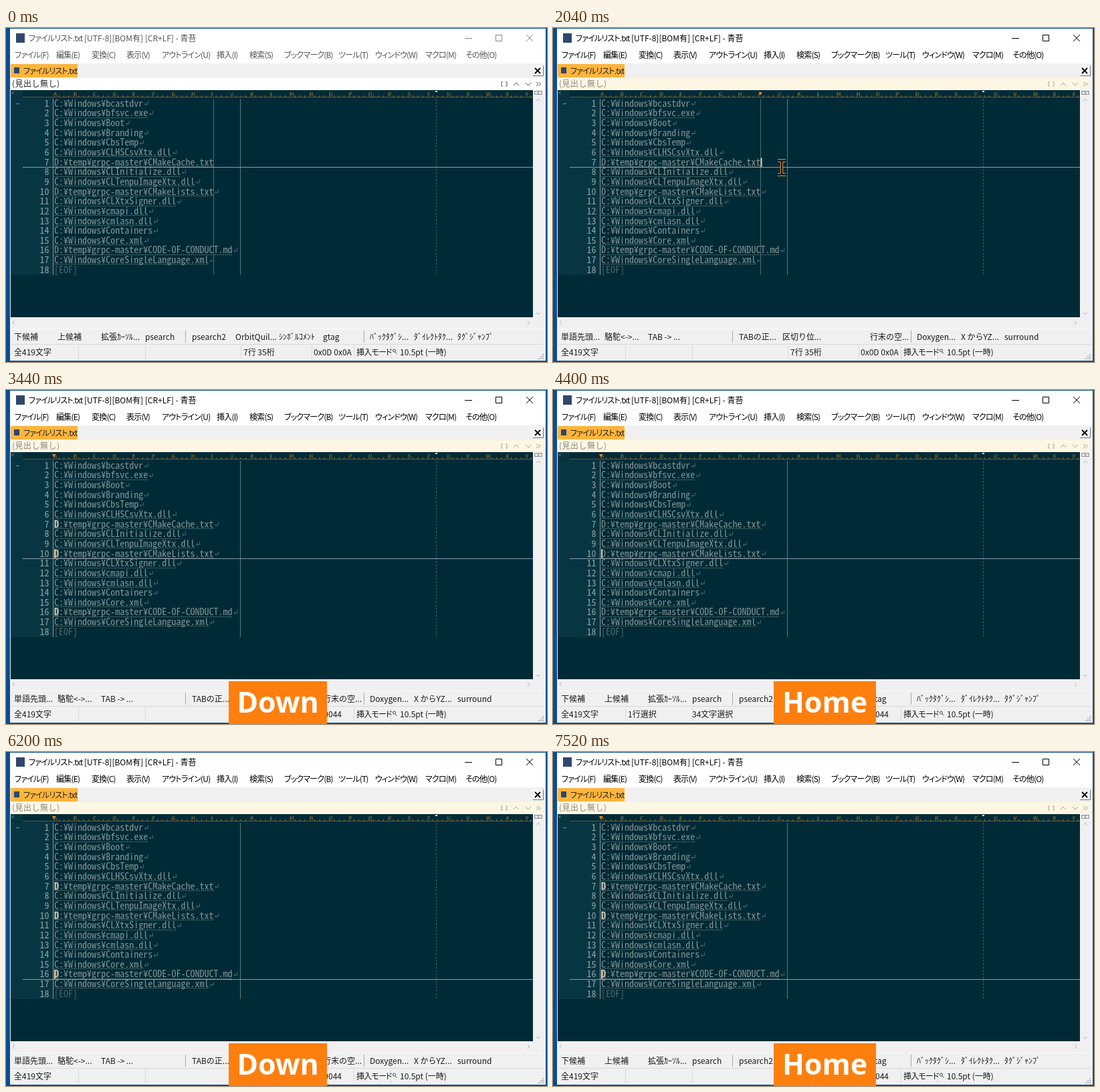
Animation of 809x500 px, one loop 8 s. Source, as an HTML page:

```html
<!DOCTYPE html>
<html lang="ja">
<head>
<meta charset="utf-8">
<title>Editor</title>
<style>
html, body { margin: 0; width: 100%; height: 100%; overflow: hidden; background: #f0f0f0; }
svg { display: block; width: 809px; height: 500px; }
text { white-space: pre; font: 12px "Noto Sans CJK JP", "Noto Sans CJK", "Noto Sans", sans-serif; }
.kana { font-feature-settings: "palt"; letter-spacing: -.8px; }
.code { font-family: "Noto Sans Mono CJK JP", "Noto Sans Mono", monospace; }
.key { font: bold 43px "Open Sans", "Noto Sans", sans-serif; word-spacing: 3px; }
.tiny { font-size: 7px; }
</style>
</head>
<body>
<svg viewBox="0 0 809 500"><g id="scene"></g><g id="mouse"></g></svg>
<script>
const LOOP = 8000, ROW = 14.65, TOP = 106, LEFT = 72, CHAR = 7.02, EDGE = 788;
const files = ['bcastdvr', 'bfsvc.exe', 'Boot', 'Branding', 'CbsTemp', 'CLHSCsvXtx.dll',
  '*CMakeCache.txt', 'CLInitialize.dll', 'CLTenpuImageXtx.dll', '*CMakeLists.txt',
  'CLXtxSigner.dll', 'cmapi.dll', 'cmlasn.dll', 'Containers', 'Core.xml',
  '*CODE-OF-CONDUCT.md', 'CoreSingleLanguage.xml'];
const lines = files.map(f => f[0] === '*' ? 'D:¥temp¥grpc-master¥' + f.slice(1) : 'C:¥Windows¥' + f);

const menus = [[13, 'ファイル(F)'], [75, '編集(E)'], [128, '変換(C)'], [180, '表示(V)'],
  [233, 'アウトライン(U)'], [315, '挿入(I)'], [364, '検索(S)'], [416, 'ブックマーク(B)'],
  [497, 'ツール(T)'], [552, 'ウィンドウ(W)'], [627, 'マクロ(M)'], [687, 'その他(O)']];
const slots = [12, 77, 142, 208, 278, 343, 408, 474, 544, 610, 675];
const bars = [
  ['下候補', '上候補', '拡張ｶｰｿﾙ...', 'psearch', 'psearch2', 'OrbitQuil...', 'ｼﾝﾎﾞﾙｺﾒﾝﾄ', 'gtag',
    'ﾊﾞｯｸﾀｸﾞｼ...', 'ﾀﾞｲﾚｸﾄﾀｸ...', 'ﾀｸﾞｼﾞｬﾝﾌﾟ'],
  ['単語先頭...', '駱駝<->...', 'TAB -> ...', '', 'TABの正...', '区切り位...', '', '行末の空...',
    'Doxygen...', 'X からYZ...', 'surround']];
// key label: [left, width, top]
const keys = { 'Down': [333, 147, 436], 'Home': [330, 153, 436], 'Shift + End': [275, 260, 433],
  'Shift + Home': [250, 311, 433], 'Ctrl + Shift + C': [202, 409, 433] };

// Each step changes part of the state and holds until the next one.
const steps = [
  [0, { active: 0, line: 7, col: 34, bar: 0, hit: '', sel: 0, info: 0, key: '', mark: 1 }],
  [1120, { active: 1 }],
  [2040, { bar: 1 }],
  [2120, { key: 'Shift + Home' }],
  [2200, { sel: 7, col: 0, info: 34, mark: 0 }],
  [2320, { bar: 0 }],
  [2840, { key: 'Down', sel: 0, line: 8 }],
  [2920, { hit: 'C', info: 0, mark: 1 }],
  [3000, { line: 9 }],
  [3200, { line: 10 }],
  [3280, { hit: 'D' }],
  [3440, { bar: 1 }],
  [3520, { key: 'Shift + End' }],
  [3600, { sel: 10, col: 34, info: 34, mark: 0, hit: '' }],
  [3720, { bar: 0 }],
  [4080, { key: 'Ctrl + Shift + C' }],
  [4400, { key: 'Home', sel: 0, col: 0 }],
  [4560, { hit: 'D', info: 0, mark: 1 }],
  [4720, { key: 'Down', line: 11 }],
  [4800, { hit: 'C' }],
  [5000, { line: 12 }],
  [5200, { line: 13 }],
  [5280, { line: 14 }],
  [5320, { line: 15 }],
  [5520, { line: 16 }],
  [5600, { hit: 'D' }],
  [6200, { bar: 1 }],
  [6400, { key: 'Shift + End' }],
  [6480, { sel: 16, col: 38, info: 38, mark: 0, hit: '' }],
  [6600, { bar: 0 }],
  [7280, { key: 'Ctrl + Shift + C' }],
  [7360, { key: 'Home', sel: 0, col: 0 }],
  [7520, { hit: 'D', info: 0, mark: 1 }]
];
const states = [];
steps.forEach(([, change], i) => states.push({ ...states[i - 1], ...change }));

// Pick the size that gives the code font its cell width.
const pen = document.createElement('canvas').getContext('2d');
pen.font = '100px "Noto Sans Mono CJK JP", "Noto Sans Mono", monospace';
const codeSize = 100 * CHAR / pen.measureText('M').width;

const esc = s => String(s).replace(/&/g, '&amp;').replace(/</g, '&lt;');
const rect = (x, y, w, h, fill, more = '') =>
  `<rect x="${x}" y="${y}" width="${w}" height="${h}" fill="${fill}" ${more}/>`;
const text = (x, y, s, fill = '#1a1a1a', cls = '', more = '') =>
  `<text x="${x}" y="${y}" fill="${fill}" class="${cls}" ${more}>${esc(s)}</text>`;
const path = (d, stroke, width = 1, more = '') =>
  `<path d="${d}" fill="none" stroke="${stroke}" stroke-width="${width}" ${more}/>`;
const code = (x, y, s, fill, more = '') => text(x, y, s, fill, 'code', `style="font-size:${codeSize}px" ${more}`);
const rowTop = n => TOP + (n - 1) * ROW;
const caretX = col => LEFT + col * CHAR;

function header(s) {
  const ink = s.active ? '#000' : '#555', button = s.active ? '#000' : '#888';
  const dim = s.active ? '#8a8880' : '#222';
  let o = rect(6, 1, 801, 52, '#fff') + rect(15, 8, 13, 14, '#30466e');
  o += text(34, 20, 'ファイルリスト.txt', ink, 'kana');
  o += text(117, 20, '[UTF-8][BOM有] [CR+LF] - 青苔', ink);
  o += path('M686 15.5h11M732.5 10.5h9v9h-9zM778 10l10 10M788 10l-10 10', button);
  o += menus.map(([x, s]) => text(x, 45, s, ink, 'kana')).join('');
  o += rect(6, 53, 801, 22, '#f0f0f0') + rect(7, 54, 100, 20, '#ffb53c');
  o += rect(12, 59, 8, 9, '#30466e') + text(26, 69, 'ファイルリスト.txt', '#222', 'kana');
  o += rect(788, 56, 15, 16, '#f4f4f4') + path('M788 71.5h15.5v-15', '#777') + path('M791 60l8 8M799 60l-8 8', '#000', 1.8);
  o += rect(7, 75, 797, 18, s.active ? '#fdf6e3' : '#fff') + text(9, 88, '(見出し無し)', dim, '', 'letter-spacing=".5"');
  o += path('M743 81h-2v6h2M747 81h2v6h-2M759 86l4-4 4 4M777 82l4 4 4-4M793 81l3 3-3 3M796.5 81l3 3-3 3', s.active ? '#a5a198' : '#555');
  return o;
}

function ruler(s) {
  let o = rect(7, 93, EDGE - 7, 12, '#002b36') + rect(7, 93, 18, 11, '#073642');
  o += path(`M25 103.5H${EDGE}`, '#6a5a34') + path('M8 95l4 4M12 95l-4 4', '#587078');
  for (let i = 0; i < 98; i++) {
    const x = LEFT + i * 7.35;
    o += i % 4 ? path(`M${x} 101v2`, '#a07a36') : text(x, 102, String.fromCharCode(65 + i / 4), '#a07a36', 'tiny') + path(`M${x} 97v6`, '#80653a', .7);
  }
  if (s.active) {
    const x = caretX(s.col) - 1;
    o += `<path d="M${x - 2} 96h5l-2.5 5z" fill="#e28a2c"/>`;
  }
  return o + rect(642, 94, 3, 2, '#e8e8e0');
}

function editor(s) {
  const end = TOP + 18 * ROW;
  let o = rect(7, 93, EDGE - 7, 340, '#002b36') + rect(7, 104, 62, end - 104, '#073642') + ruler(s);
  o += path(`M70.5 106V${end}`, '#93a1a1') + path(`M350.5 106V${end}`, '#5b7878');
  o += path(`M643.5 106V${end}`, '#3d5a60', 1, 'stroke-dasharray="3 2"');
  if (s.col && !s.sel) o += path(`M310.5 106V${end}`, '#4c6a6c');
  for (let n = 1; n <= 18; n++) {
    const y = rowTop(n) + 11.7, line = lines[n - 1];
    o += code(64.5, y, n, '#93a1a1', 'text-anchor="end"');
    if (!line) { o += code(LEFT, y, '[EOF]', '#4c666e'); continue; }
    const right = caretX(line.length), picked = s.sel === n;
    if (picked) o += rect(LEFT, Math.floor(rowTop(n)), right - LEFT, 15, '#f3ecda');
    o += code(LEFT, y, line, picked ? '#7f9092' : '#839496');
    if (line.includes('.')) o += path(`M${LEFT} ${Math.floor(rowTop(n) + 13.5) + .5}H${right}`, '#55726f', 1, 'stroke-dasharray="2 1"');
    if (!(n === s.line && s.col && !s.sel))
      o += path(`M${right + 7} ${y - 8}v4.5h-5m2-2l-2 2 2 2`, '#4a686f');
    if (s.hit === line[0])
      o += rect(LEFT, rowTop(n) + .5, 7, 13.5, '#44585a') + code(LEFT, y, s.hit, '#f2eddd', 'font-weight="bold"');
  }
  if (s.mark) o += path('M15 113.5h5', '#7b9094');
  if (s.sel) {
    const y = rowTop(s.sel);
    o += path(`M15 ${y - 7}h5M17.5 ${y + 1}v13h4`, '#6d858a');
  } else {
    o += rect(25, Math.floor(rowTop(s.line + 1) - .3), EDGE - 25, 1, '#8c9aae');
    if (s.active) o += rect(caretX(s.col), rowTop(s.line) + .5, 1.8, 13.5, '#f0cfa4');
  }
  return o;
}

function scrollbars() {
  return rect(EDGE, 93, 16, 340, '#f0f0f0') + rect(EDGE, 93, 16, 8, '#fff') +
    rect(790.5, 94.5, 11, 5, '#e4e4e4', 'stroke="#888"') + path('M796 95v4', '#777') +
    path('M793 109l3-3 3 3M793 426l3 3 3-3M13 438l-3 3 3 3M780 438l3 3-3 3', '#b4b4b4');
}

function footer(s) {
  let o = path('M7 450.5H804', '#f8f8f8') + path('M7 473.5H804', '#d8d8d8');
  o += bars[s.bar].map((label, i) => text(slots[i], 467, label)).join('');
  o += path('M268.5 453v18M535.5 453v18', '#a8a8a8');
  o += path([108, 208, 351, 457, 520, 575].map(x => `M${x}.5 475v21`).join(''), '#dadada');
  o += path('M803 488v9M800 491v6M797 494v3', '#b8b8b8', 2, 'stroke-dasharray="2 1"');
  const char = s.col ? '0x0D 0x0A' : 'U+00' + lines[s.line - 1].charCodeAt(0).toString(16);
  o += text(12, 490, '全419文字');
  if (s.info) o += text(112, 490, '1行選択') + text(208, 490, s.info + '文字選択');
  o += text(355, 490, `${s.line}行 ${s.col + 1}桁`) + text(460, 490, char);
  o += text(524, 490, '挿入モード', '#1a1a1a', 'kana') + text(589, 490, '10.5pt (一時)');
  return o + '<circle cx="580.5" cy="483" r="2" fill="none" stroke="#444"/>' + path('M582 485l2.5 2.5', '#444');
}

function keyLabel(name) {
  if (!name) return '';
  const [x, w, y] = keys[name];
  return rect(x, y, w, 500 - y, '#ff7f0e') + text(x + w / 2, 483, name, '#fff', 'key', 'text-anchor="middle"');
}

const draw = s => rect(0, 0, 809, 500, '#0b4d92') + rect(6, 1, 801, 497, '#f0f0f0') +
  header(s) + editor(s) + scrollbars() + footer(s) + keyLabel(s.key);

const mix = (a, b, k) => a + (b - a) * k;
const clamp = v => Math.min(1, Math.max(0, v));
const ease = k => k * k * (3 - 2 * k);

function pointer(t) {
  if (t < 200 || t >= 2120) return '';
  const tick = Math.floor(t / 40) * 40;
  const a = ease(clamp((tick - 160) / 760)), b = ease(clamp((tick - 1000) / 240));
  const x = mix(mix(662, 331, a), 342, b), y = mix(mix(492, 217, a), 209, b);
  const at = `transform="translate(${x} ${y})"`;
  if (y > 432) return `<path ${at} d="M0 0v16l4-4 3 6 2-1-3-6h5z" fill="#fff" stroke="#000"/>`;
  const beam = 'M-6-10.5h4q2 0 2 2q0-2 2-2h4M0-9V9M-6 10.5h4q2 0 2-2q0 2 2 2h4';
  return path(beam, '#f0a050', 4.4, at) + path(beam, '#111', 2.4, at);
}

const scene = document.getElementById('scene'), mouse = document.getElementById('mouse');
const start = performance.now();
let shown = -1, shownMouse = null;

function frame() {
  const t = (performance.now() - start) % LOOP;
  let i = steps.length - 1;
  while (steps[i][0] > t) i--;
  if (i !== shown) scene.innerHTML = draw(states[shown = i]);
  const p = pointer(t);
  if (p !== shownMouse) mouse.innerHTML = shownMouse = p;
  requestAnimationFrame(frame);
}
frame();
</script>
</body>
</html>
```
